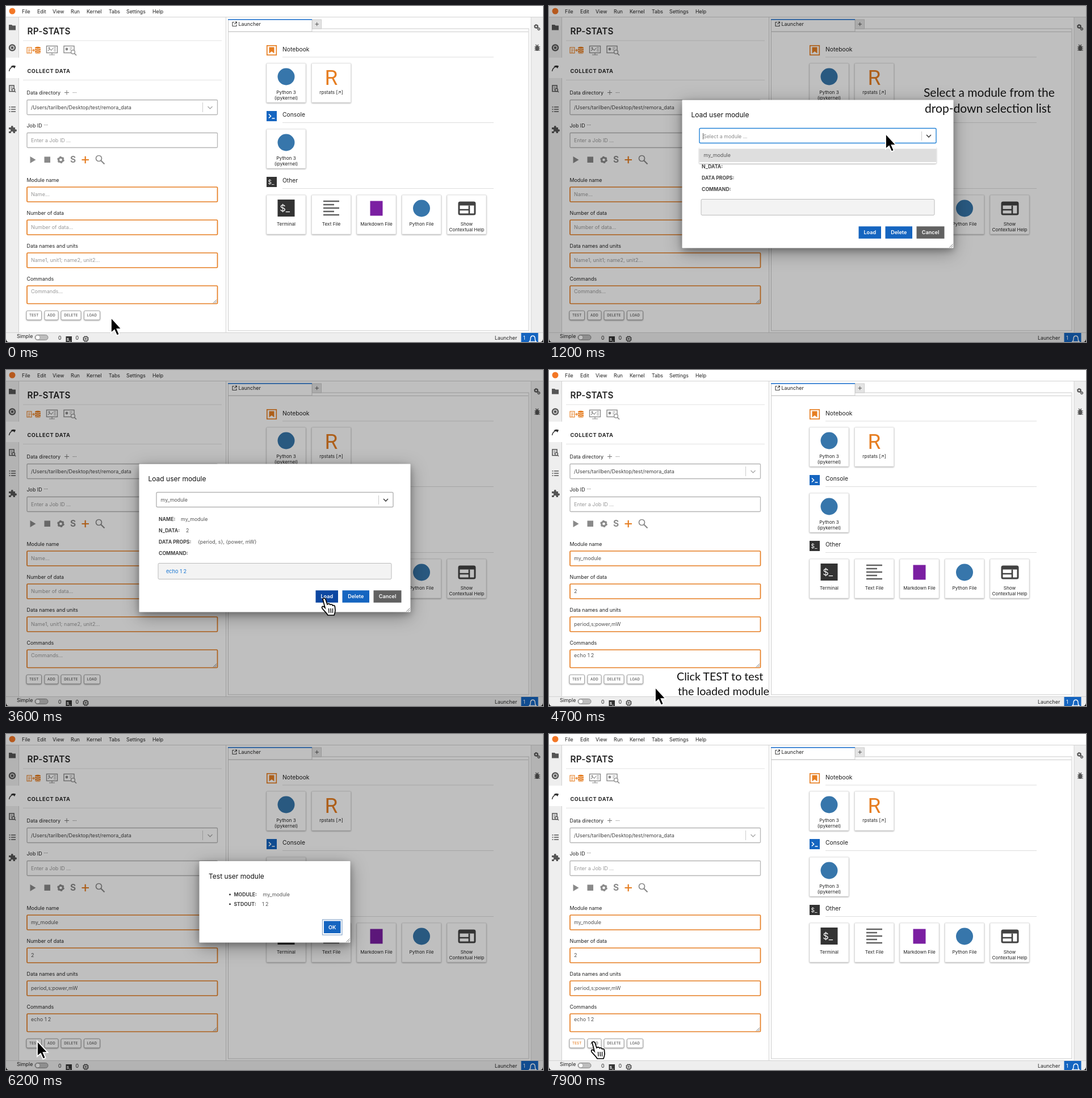
Write an HTML page that moves like this. It is 946 px wide and 592 px high and loops after 8000 ms.

```html
<!DOCTYPE html>
<html lang="en">
<head>
<meta charset="utf-8">
<title>Load user module</title>
<style>
html, body { margin: 0; width: 100%; height: 100%; overflow: hidden; background: #fff }
svg { display: block; width: 946px; height: 592px }
text { font-family: Inter, "Liberation Sans", sans-serif; white-space: pre }
.caption { font-family: Lato, "Open Sans", sans-serif }
.card { filter: drop-shadow(0 1px 1px #0005) }
.dialog { filter: drop-shadow(0 4px 6px #0004) drop-shadow(0 7px 15px #0005) }
</style>
</head>
<body>
<svg id="stage" viewBox="0 0 946 592"></svg>
<script>
const ORANGE = '#e67e22', BLUE = '#1565c0', DARK = '#424242', GREY = '#8a8a8a';

const text = (x, y, s, { z = 8.9, f = '#222', w = 400, a = 'start', ls = 0, c = '' } = {}) =>
  `<text x="${x}" y="${y}" font-size="${z}" fill="${f}" font-weight="${w}" text-anchor="${a}" letter-spacing="${ls}" class="${c}">${s}</text>`;
const mid = (x, y, s, o) => text(x, y, s, { a: 'middle', ...o });
const rect = (x, y, w, h, fill, stroke = 'none', sw = 1, r = 0, c = '') =>
  `<rect x="${x}" y="${y}" width="${w}" height="${h}" rx="${r}" fill="${fill}" stroke="${stroke}" stroke-width="${sw}" class="${c}"/>`;
const circle = (x, y, r, fill, stroke = 'none', sw = 1) =>
  `<circle cx="${x}" cy="${y}" r="${r}" fill="${fill}" stroke="${stroke}" stroke-width="${sw}"/>`;
const fill = (d, f) => `<path d="${d}" fill="${f}"/>`;
const line = (d, s, w = 1) => `<path d="${d}" fill="none" stroke="${s}" stroke-width="${w}"/>`;
const group = (id, s, extra = '') => `<g id="${id}" ${extra}>${s}</g>`;
const gear = (x, y, r, f) => circle(x, y, r, 'none', f, r * .8) +
  circle(x, y, r * 1.42, 'none', f, r * .4).replace('/>', ` stroke-dasharray="${r * .75} ${r * .737}"/>`);
const grip = (x, y) => line(`M${x - 6} ${y}l6 -6M${x - 3} ${y}l3 -3`, '#666', .9);

// Window frame, menu and side bars
function chrome() {
  let s = rect(0, 0, 946, 592, '#fff') + rect(0, 20, 22.5, 556, '#eee') + rect(925, 20, 21, 556, '#eee') +
    rect(0, 576, 946, 16, '#eee') + rect(0, 91, 23, 36, '#fff') +
    line('M0 19.5H946M387.5 20V576M925 20V576M22.5 20V91M22.5 127V576M0 575.5H946', '#d2d2d2') +
    circle(11, 9, 5.5, '#f37726');
  [['File', 28], ['Edit', 55], ['View', 82], ['Run', 114], ['Kernel', 142], ['Tabs', 181], ['Settings', 212], ['Help', 258]]
    .forEach(([m, x]) => s += text(x, 13, m, { z: 8.8 }));

  s += fill('M5 33h5l1.5 1.5h5.5v8H5z', '#555') +
    circle(11, 73.5, 5, 'none', '#555', 2.5) + rect(8.8, 71.3, 4.4, 4.4, '#555') +
    line('M5.500 115q1-8 11-9', '#333', 1.5) + fill('M8 107q4-4 9-1l-2 4q-2-3-7-3z', '#333') +
    rect(6, 140, 8, 10.5, 'none', '#555', 1.6) + line('M8 143h4M8 146h3', '#555') +
    circle(13, 148, 2.5, '#eee', '#555', 1.4) + line('M15 150l2 2', '#555', 1.5) +
    line('M9 178h8M9 182h8M9 186h8M5.5 178h2M5.5 182h2M5.5 186h2', '#555', 1.5) +
    fill('M5 214h4a2 2 0 1 1 3.5 0H16v3.5a2 2 0 1 1 0 3.5v3H12.5a2 2 0 1 0-3.5 0H5v-3.5a2 2 0 1 0 0-3z', '#555') +
    gear(934, 36, 2.5, '#555') + gear(938.5, 40.5, 1.7, '#555') +
    rect(932.5, 70, 6.5, 9, '#555', 'none', 0, 3) + line('M931 72h10M931 75h10M931 78h10M933 68l2 2M938 68l-2 2', '#555', 1.2);

  s += text(19, 585, 'Simple') + rect(51, 579.5, 23, 9, '#bdbdbd', '#888', 1, 4.5) + circle(56, 584, 4, '#fff', '#888', .7) +
    text(92, 588, '0') + rect(105.5, 582, 10.5, 10, '#333') + text(107, 589.5, '$_', { z: 6, f: '#fff', w: 700 }) +
    text(122.5, 588, '0') + rect(137, 583, 7, 7, 'none', '#444', 1.5, 1.5) + rect(139.2, 585.2, 2.6, 2.6, '#444') +
    line('M135 585h2M135 588h2M144 585h2M144 588h2M139 581v2M142 581v2M139 590v2M142 590v2', '#444') +
    text(861, 588, 'Launcher') + rect(907.5, 576, 30, 16, BLUE) + text(911, 588, '1', { f: '#fff' }) +
    line('M922 591.5q2-1.5 2-5c0-7 8-7 8 0q0 3.500 2 5z', '#fff', 1.4) +
    fill('M0 587v5h5q-4 0-5-5zM946 587v5h-5q4 0 5-5z', '#111');
  return s;
}

const field = (y, h, color, w) => rect(37, y, 335.5, h, '#fff', color, w, 1.5);
const smallButton = (x, w, s, id) =>
  rect(x, 537, w, 16, '#fff', '#999', .9, 2, 'card') +
  group(id, mid(x + w / 2, 547.2, s, { z: 6.2, f: '#555', w: 500, ls: .2 }));

function panel() {
  let s = text(37.5, 49.5, 'RP-STATS', { z: 15.3, w: 600, ls: .15 }) +
    text(37.5, 118.3, 'COLLECT DATA', { z: 9.2, w: 700, ls: .55 }) +
    line('M30 61H380M30 130.5H380', '#e2e2e2');

  // Panel tabs
  s += rect(37, 73, 8, 10, 'none', ORANGE, 1.1) + line('M39 76h4M39 78.5h4M39 81h3M45 78h5m-2-2 2 2-2 2', ORANGE, 1.2) +
    fill('M51 73q5-2.5 10 0v10q-5 2.5-10 0z', ORANGE) + line('M51 75q5 2 10 0M51 78.500q5 2 10 0M51 82q5 2 10 0', '#fff') +
    rect(71.5, 70.5, 19, 12, 'none', GREY, 1.4) + line('M74 79l3-3 3 2 3-4M84 73h4M84 76h4M84 79h4M81 83v3M76 86h10', GREY, 1.1) +
    circle(76, 74, 1.5, GREY) +
    rect(102, 70.5, 18, 12, 'none', GREY, 1.4) + circle(107, 76, 2.4, GREY) + line('M112 74h5M112 77h3', GREY, 1.2) +
    circle(118, 81, 3.4, '#fff', GREY, 1.3) + line('M120.5 83.5l3.5 3.5', GREY, 1.6);

  s += text(36.5, 156, 'Data directory') + line('M103 152.5h8M107 148.5v8', '#777') + text(117, 155.5, '···', { f: '#555' }) +
    text(36.5, 213.7, 'Job ID') + text(66.5, 213.2, '···', { f: '#555' }) +
    field(165.5, 26, '#b5b5b5', 1.3) + text(44, 182, '/Users/tarilben/Desktop/test/remora_data', { z: 9, f: '#444' }) +
    line('M346.5 170V187', '#ccc') + line('M355.5 177l4 4 4-4', '#aaa', 1.4) +
    field(223.5, 26, '#b5b5b5', 1.3) + text(44, 240, 'Enter a Job ID ...', { z: 9, f: '#999' });

  s += fill('M42.5 265v12l10-6z', GREY) + rect(67.5, 265.5, 10.5, 10.5, GREY) + gear(96.5, 271, 3.9, GREY) +
    text(113, 276, 'S', { z: 15.5, f: GREY, w: 700 }) + line('M133.5 271h12.5M139.7 264.7v12.5', ORANGE, 2.2) +
    circle(163.5, 268.5, 5, 'none', GREY, 1.7) + line('M167 272l6.5 6.5', GREY, 2.2);

  ['Module name', 'Number of data', 'Data names and units', 'Commands'].forEach((label, i) =>
    s += text(36.5, 309.5 + i * 58, label) + field(319 + i * 58, i < 3 ? 26 : 31.5, ORANGE, 1.7));
  const rows = (list, f) => list.map((v, i) => text(44, [335.3, 393.3, 451.3, 505.5][i], v, { z: 9, f })).join('');
  s += group('empty', rows(['Name...', 'Number of data...', 'Name1, unit1; name2, unit2...', 'Commands...'], '#999')) +
    group('filled', rows(['my_module', '2', 'period,s;power,mW', 'echo 1 2'], '#555')) + grip(371, 523.5);
  return s + smallButton(36, 26.5, 'TEST', 'testLabel') + smallButton(68, 24, 'ADD', 'addLabel') +
    smallButton(97, 35, 'DELETE', 'deleteLabel') + smallButton(137.5, 28, 'LOAD', 'loadLabel');
}

function launcher() {
  let s = rect(391.5, 40, 529.5, 532, '#fff', '#ccc') + rect(391.5, 23.5, 147.5, 21.5, '#fff', '#ccc') +
    line('M391 45.5H920', '#ccc') + rect(391, 23, 148, 1.7, '#2a78d0') +
    rect(539.5, 24, 16, 16, '#e4e4e4', '#ccc') + line('M544.5 32h6.5M547.7 28.7v6.5', '#555') +
    line('M402 28.5h-3v7h7v-3M402.5 32l3.7-3.7M403.5 28h3v3', '#444', 1.1) + text(409.5, 35.2, 'Launcher');

  [['Notebook', 76], ['Console', 191.5], ['Other', 307.5]].forEach(([name, y]) =>
    s += text(487, y + 3.7, name, { z: 10.3 }) + line(`M487 ${y + 14}H859`, '#ddd'));
  s += rect(459.8, 69.8, 16.5, 16.5, '#fff', ORANGE, 1.7) + fill('M463.5 72.5h9v11l-4.5-3.5-4.5 3.5z', ORANGE) +
    rect(459, 185, 18, 18, BLUE) + line('M463 190.5l3.5 3.5-3.5 3.5M468.5 198h5', '#fff', 1.6) +
    rect(459, 301, 18, 18, '#333') + text(461.5, 314, '$_', { z: 10, f: '#fff' });

  const card = (col, y, icon, ...labels) => {
    const x = 459 + col * 79.5, cx = x + 34.5;
    s += rect(x, y, 69, 69, '#fff', '#ddd', .8, 1, 'card') + icon(cx, y + 23.5) +
      labels.map((l, i) => mid(cx, y + 54.4 + i * 9.6, l, { z: 8.2 })).join('');
  };
  const python = (x, y) => circle(x, y, 15, '#3776ab');
  card(0, 101, python, 'Python 3', '(ipykernel)');
  card(1, 101, (x, y) => `<text x="${x}" y="${y + 14}" text-anchor="middle" font-size="37" fill="${ORANGE}" style="font-family:Roboto,sans-serif">R</text>`, 'rpstats [↗]');
  card(0, 217, python, 'Python 3', '(ipykernel)');
  card(0, 333, (x, y) => rect(x - 15, y - 15.5, 30, 30, '#333') + text(x - 11, y + 5, '$_', { z: 16, f: '#fff' }), 'Terminal');
  card(1, 333, (x, y) => line([28, 19, 28, 19, 28].map((w, i) => `M${x - 14} ${y - 12.5 + i * 6}h${w}`).join(''), '#616161', 2.4), 'Text File');
  card(2, 333, (x, y) => rect(x - 11, y - 13, 22, 26, '#7b1fa2'), 'Markdown File');
  card(3, 333, python, 'Python File');
  card(4, 333, (x, y) => rect(x - 13.5, y - 10.5, 28, 21, '#fff', DARK, 3, 2) + rect(x - 14, y - 11, 29, 6, DARK) +
    line(`M${x - 13} ${y + 2.5}h17M${x + 4.5} ${y - 5}v15`, DARK, 2.6), 'Show', 'Contextual Help');
  return s;
}

const button = (x, y, w, s, f, id) => rect(x, y, w, 21.5, f).replace('<rect', `<rect id="${id}"`) +
  mid(x + w / 2, y + 14, s, { z: 9.1, f: '#fff', w: 600 });
const label = (x, y, s) => text(x, y, s, { z: 8.7, f: '#444', w: 700 });
const value = (x, y, s) => text(x, y, s, { f: '#555' });

function loadDialog() {
  const chosen = value(272.5, 231.7, 'my_module') + value(308, 265.5, 'my_module') + value(317, 285.7, '2') +
    value(338, 305.7, '{period, s}, {power, mW}') + text(282, 358, 'echo 1 2', { z: 9.2, f: '#1976d2' });
  const menu = rect(264.5, 249, 418, 28.5, '#fff', 'none', 0, 2, 'card') + rect(264.5, 251.5, 418, 23.5, '#dedede') +
    value(272.5, 266.3, 'my_module');
  return rect(234.5, 165.5, 478, 261, '#fff', 'none', 0, 1, 'dialog') + text(250.5, 195.5, 'Load user module', { z: 12, f: '#111' }) +
    rect(265, 215.5, 417, 26, '#fff', '#b5b5b5', 1.4, 2).replace('<rect', '<rect id="select"') +
    line('M656.5 221V237', '#ccc') + line('M665 227l4 4 4-4', '#444', 1.6) +
    label(269, 265.5, 'NAME:') + label(269, 285.7, 'N_DATA:') + label(269, 305.7, 'DATA PROPS:') + label(269, 326.3, 'COMMAND:') +
    rect(268, 340.5, 411, 28, '#f3f3f3', '#bbb', 1, 2) +
    button(545.5, 388.3, 39.5, 'Load', BLUE, 'loadButton') + button(592.5, 388.3, 47.5, 'Delete', BLUE, 'deleteButton') +
    button(647.5, 388.3, 49, 'Cancel', '#616161', 'cancelButton') + grip(711.5, 425.5) +
    group('placeholder', text(272, 232.5, 'Select a module ...', { f: '#8b8b8b' })) +
    group('menu', line('M271.5 224V235', '#333', .8) + menu) + group('chosen', chosen);
}

const testDialog = () => rect(340.5, 224, 266, 143.5, '#fff', 'none', 0, 1, 'dialog') +
  text(357, 254.7, 'Test user module', { z: 12, f: '#111' }) + circle(394.5, 282.7, 1.5, '#333') + circle(394.5, 299.7, 1.5, '#333') +
  label(401.5, 285.7, 'MODULE:') + value(452.5, 285.7, 'my_module') + label(401.5, 302.7, 'STDOUT:') + value(451, 302.7, '1 2') +
  rect(557.5, 327, 34.5, 27, '#fff', '#8ba9cc', 1.2) + button(560, 329.5, 29.5, 'OK', BLUE, 'okButton') + grip(605.5, 366.5);

const caption = (id, x, y, z, a, b) =>
  group(id, text(x, y, a, { z, c: 'caption', f: '#111' }) + text(x + 2, y + z * 1.32, b, { z, c: 'caption', f: '#111' }));

const arrow = `<path d="M0 0V27L6 22L10.300 31.500L14.700 29.600L10.600 20.200H18.500Z" fill="#000" stroke="#fff" stroke-width="1.8"/>`;
const hand = `<path d="M2 1.5C3-.5 6-.5 7 2L10 11C12 9 14.5 10 15 11.5C17 10.5 19 11 19.5 13C21.5 12 23.5 13 23.5 15.5L24 22Q23.5 26 22 30H11C9 26 4 22 1 18C-.5 15.5 2 13.5 4 15L6 17Z" fill="#fff" stroke="#000" stroke-width="1.7"/>` +
  line('M12.5 18l.5 8M16 18l.5 8M19.5 18v8', '#000', 1.3);

const stage = document.getElementById('stage');
stage.innerHTML = chrome() + panel() + launcher() +
  group('dim', rect(0, 0, 946, 592, '#000'), 'opacity=".25"') +
  group('loadDialog', loadDialog()) + group('testDialog', testDialog()) +
  caption('selectHint', 660, 160, 21, 'Select a module from the', 'drop-down selection list') +
  caption('loadHint', 512, 479, 21.3, 'Click Load to import', 'the module infomation') +
  caption('testHint', 225, 546.5, 19.7, 'Click TEST to test', 'the loaded module') +
  group('cursor', group('arrow', arrow) + group('hand', hand));

const el = Object.fromEntries([...stage.querySelectorAll('[id]')].map(e => [e.id, e]));
const show = (id, on) => el[id].style.display = on ? '' : 'none';

// Pointer stops: time, x, y
const path = [[0, 185, 549], [100, 185, 549], [400, 148, 542], [600, 148, 542], [1000, 593, 225], [1300, 593, 225],
  [1600, 590, 258], [2500, 590, 258], [3300, 556, 402], [3800, 556, 402], [4400, 187, 559], [4900, 187, 559],
  [5500, 55, 541], [6300, 55, 541], [6800, 571, 337], [7000, 571, 337], [7700, 74, 542], [8000, 74, 542]];

function pointer(t) {
  const i = path.findIndex(p => p[0] > t), [t0, x0, y0] = path[i - 1], [t1, x1, y1] = path[i];
  const u = (t - t0) / (t1 - t0), e = u * u * (3 - 2 * u);
  return [x0 + (x1 - x0) * e, y0 + (y1 - y0) * e];
}

function draw() {
  const t = Math.floor(performance.now() % 8000 / 100) * 100;
  const within = (a, b) => t >= a && t < b;
  const loading = within(600, 3800), testing = within(5700, 7000);
  show('dim', loading || testing);
  show('loadDialog', loading);
  show('testDialog', testing);
  show('empty', t < 3800);
  show('filled', t >= 3800);
  show('placeholder', t < 1800);
  show('menu', within(1100, 1800));
  show('chosen', t >= 1800);
  el.select.setAttribute('stroke', within(1000, 1800) ? '#2684d8' : '#b5b5b5');
  el.loadButton.setAttribute('fill', within(3200, 3800) ? '#0d47a1' : BLUE);
  show('selectHint', within(900, 1900));
  show('loadHint', within(2000, 3300));
  show('testHint', within(4200, 5500));
  const tint = (id, on) => el[id].firstChild.setAttribute('fill', on ? ORANGE : '#555');
  tint('loadLabel', within(400, 600));
  tint('testLabel', within(5400, 5700) || t >= 7000);
  const pressing = within(300, 600) || within(3200, 3800) || within(5400, 5700) || within(6700, 7000) || t >= 7600;
  show('hand', pressing);
  show('arrow', !pressing);
  el.cursor.setAttribute('transform', `translate(${pointer(t)})`);
  requestAnimationFrame(draw);
}
draw();
</script>
</body>
</html>
```
